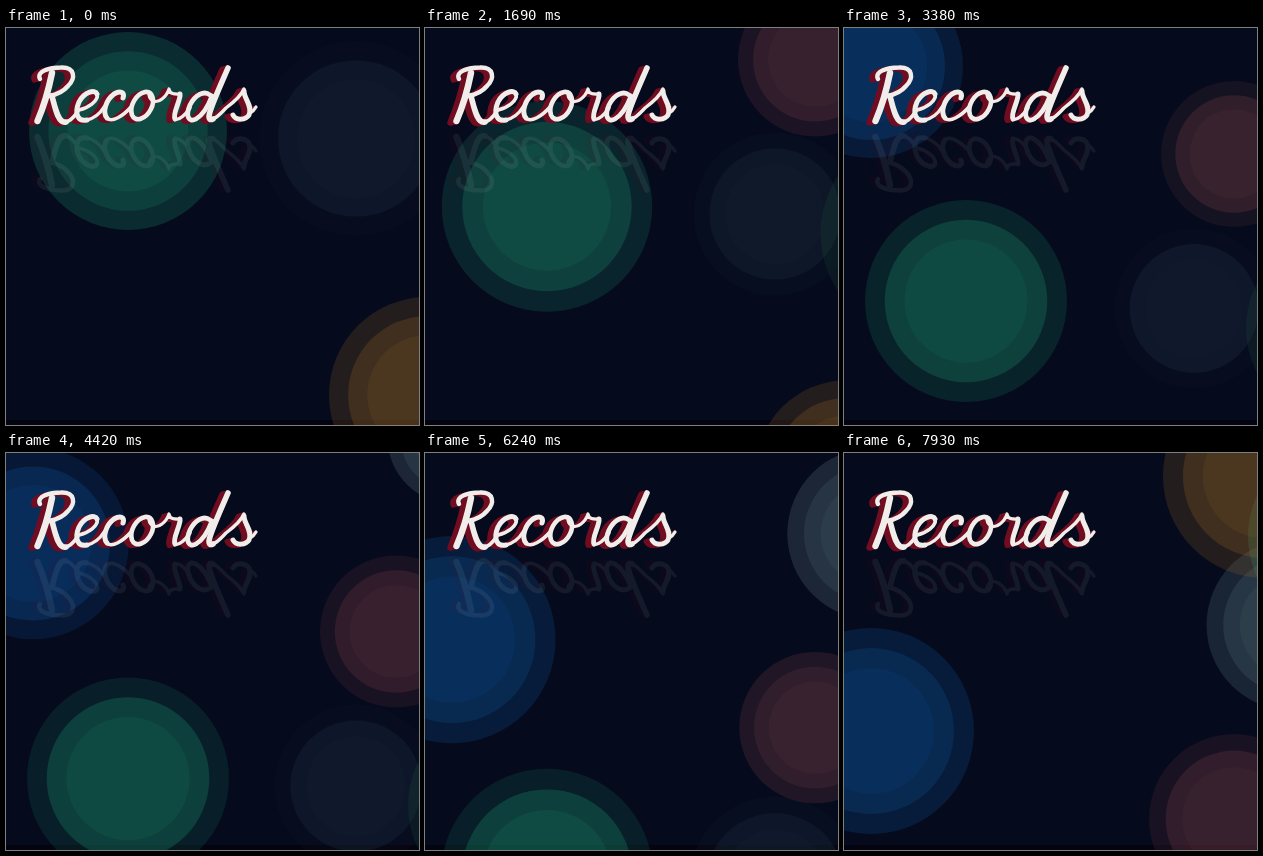
Animation, 413 px wide and 397 px high, one loop 8000 ms. Source, as an HTML page with a canvas:

```html
<!DOCTYPE html>
<html lang="en">
<head>
<meta charset="utf-8">
<title>Records</title>
<style>
html, body { margin: 0; width: 100%; height: 100%; overflow: hidden; background: #050a1c; }
canvas { display: block; width: 413px; height: 397px; }
</style>
</head>
<body>
<canvas id="stage" width="413" height="397" role="img" aria-label="Records"></canvas>
<script>
const W = 413, H = 397, LOOP = 8000, STEP = 130;
const ctx = document.getElementById('stage').getContext('2d');

// Shared key times and the downward drift at each of them
const TIMES = [0, 910, 2470, 3380, 5460, 6890, 7930];
const DRIFT = [0, 35.5, 115.5, 170, 275, 355, 410];

// x, starting y, radius and halo opacity at the key times
const discs = [
  { x: 122, y: 103, rgb: '28,150,112', r: [99, 104, 106.5, 101, 101, 110, 100], halo: [.24, .11, .27, .18, .12, .18, .18] },
  { x: 350, y: 110.5, rgb: '30,45,62', r: [97, 87, 76, 80, 83, 88, 88], halo: [.1, .17, .08, .08, .12, .12, .12] },
  { x: 500, y: 130, rgb: '40,120,70', r: [85, 109, 100, 98, 98, 98, 98], halo: [.12] },
  { x: 421, y: 367, rgb: '154,106,38', r: [98, 88, 92, 90, 90, 90, 90], halo: [.2] },
  { x: 390, y: -44, rgb: '118,60,70', r: [38, 84, 70, 73, 79, 73, 85], halo: [.2, .17, .24, .15, .2, .27, .17] },
  { x: 27, y: -132, rgb: '15,90,165', r: [20, 30, 58, 92, 99.5, 107, 103], halo: [.3, .3, .3, .2, .17, .26, .22] },
  { x: 448, y: -238, rgb: '92,120,130', r: [20, 20, 20, 50, 83, 88, 85.5], halo: [.25, .25, .25, .25, .27, .25, .23] },
  { x: 500, y: -327, rgb: '28,150,112', r: [20, 20, 20, 20, 40, 98, 96], halo: [.24] },
  { x: 421, y: -387, rgb: '154,106,38', r: [20, 20, 20, 20, 20, 28, 102], halo: [.2] }
];

const strokes = [
  [6.4, 'M46 45C43 60 38 78 31.5 93'],
  [4.4, 'M34 51C30 43 44 39.5 55 39.5C69 39 70 50 62 58C57 64 49 67 43 68'],
  [5.6, 'M46 68C49 79 52 96 60 94'],
  [3.6, 'M60 94C66 93 69 87 73 82C82 80 93 73 91 66'],
  [5, 'M91 66C89 61 78 64 73 74C68 86 72 94 81 92'],
  [3.4, 'M81 92C89 90 95 84 98 79'],
  [5, 'M117 70C119 64 114 62.5 108 66C100 72 96 84 101 90'],
  [3.6, 'M101 90C106 95 117 88 125 79'],
  [4.6, 'M139 64C130 66 123 78 126 87C129 95 140 91 145 81C149 73 147 63 139 64'],
  [3.2, 'M143 64C142 73 150 76 156 71C160 68 162 64 163 61C164 67 170 66 174 66'],
  [5, 'M174 66C175 72 166 86 169 91'],
  [3.4, 'M169 91C173 93 180 86 184 80'],
  [4.8, 'M204 67C198 62 189 67 184 77C179 88 183 95 190 91C197 87 203 76 206 68'],
  [5.6, 'M222 40C216 54 204 80 203 88C203 92 205 92 207 91'],
  [3.4, 'M207 91C212 89 216 84 220 80C228 74 235 68 238 61'],
  [5, 'M238 63C238 71 247 78 243 87C240 92 230 93 227 87'],
  [3.2, 'M243 86C246 84 249 81 250 79']
].map(([w, d]) => [w, new Path2D(d)]);

function write(c, dx, dy, color) {
  c.save();
  c.translate(dx, dy);
  c.strokeStyle = color;
  c.lineCap = c.lineJoin = 'round';
  for (const [w, path] of strokes) {
    c.lineWidth = w;
    c.stroke(path);
  }
  c.restore();
}

const title = document.createElement('canvas');
title.width = W;
title.height = 102;
const tc = title.getContext('2d');
for (let d = 6; d > 0; d -= 1.5) write(tc, -d, d / 4, '#710d20');
write(tc, 0, 0, '#f0edeb');

function at(list, t) {
  if (list.length === 1) return list[0];
  let i = 0;
  while (i < TIMES.length - 2 && t > TIMES[i + 1]) i++;
  const k = Math.min(1, (t - TIMES[i]) / (TIMES[i + 1] - TIMES[i]));
  return list[i] + (list[i + 1] - list[i]) * k;
}

function dot(x, y, r, rgb, alpha) {
  ctx.fillStyle = `rgba(${rgb},${alpha})`;
  ctx.beginPath();
  ctx.arc(x, y, r, 0, Math.PI * 2);
  ctx.fill();
}

// Opacity to add so that stacked layers reach the wanted total
const over = (want, have) => 1 - (1 - want) / (1 - have);

function disc(o, t) {
  const y = o.y + at(DRIFT, t), r = at(o.r, t), a = at(o.halo, t);
  dot(o.x, y, r, o.rgb, a);
  dot(o.x, y, r * .805, o.rgb, over(.39, a));
  dot(o.x, y, r * .61, o.rgb, over(.46, .39));
}

function draw(t) {
  ctx.fillStyle = '#050a1c';
  ctx.fillRect(0, 0, W, H);
  ctx.fillStyle = '#040310';
  ctx.fillRect(0, 392, W, 5);
  discs.forEach(o => disc(o, t));

  ctx.save();
  ctx.globalAlpha = .07;
  ctx.translate(0, 202);
  ctx.scale(1, -1);
  ctx.drawImage(title, 0, 0);
  ctx.restore();
  ctx.drawImage(title, 0, 0);
}

const start = performance.now();
function tick() {
  const t = (performance.now() - start) % LOOP;
  draw(Math.floor(t / STEP) * STEP);
  requestAnimationFrame(tick);
}
tick();
</script>
</body>
</html>
```
